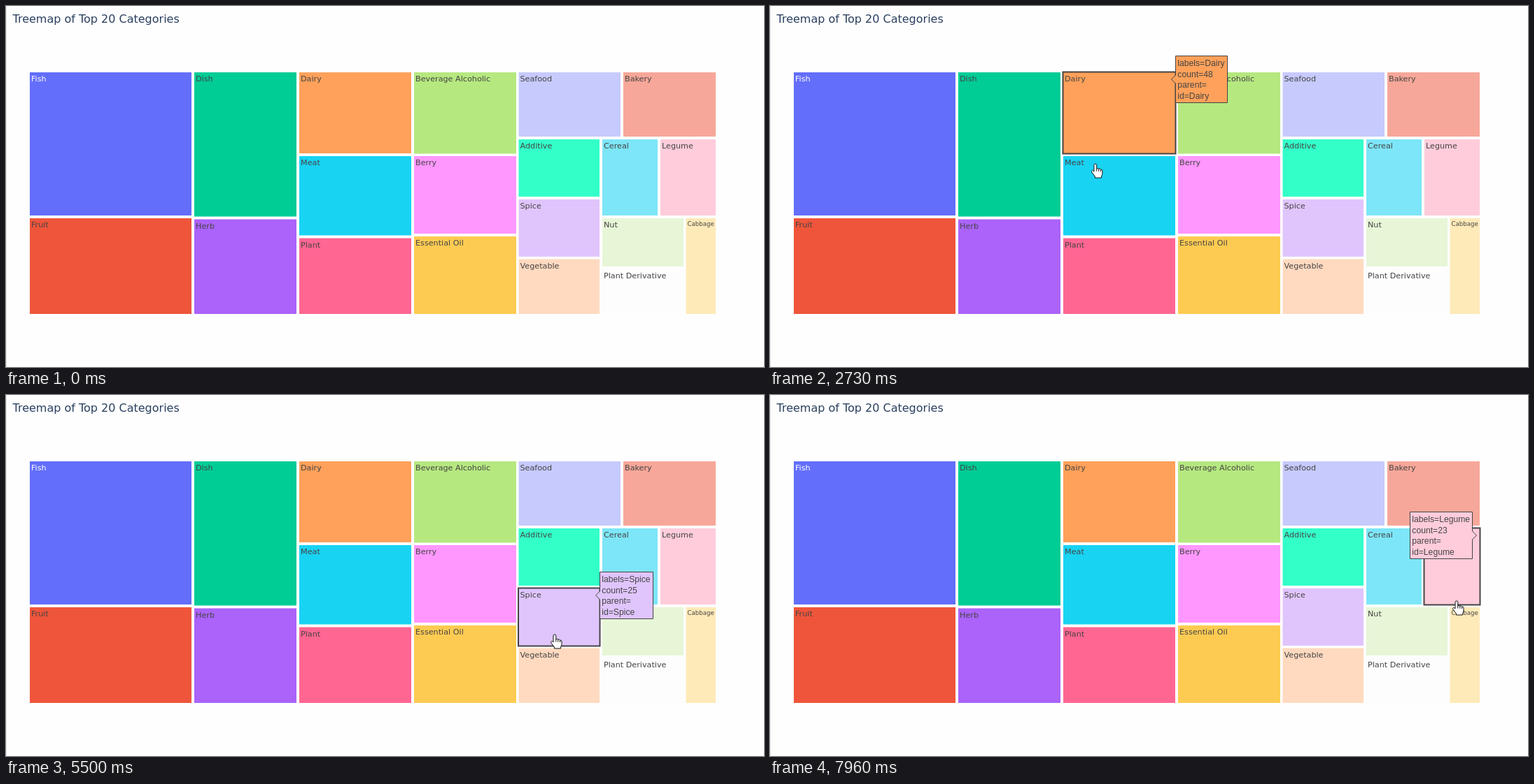
An HTML page with a canvas that plays this animation: 1083 px wide and 517 px high, repeating every 7.99 s.

```html
<!DOCTYPE html>
<html lang="en">
<head>
<meta charset="utf-8">
<title>Treemap of Top 20 Categories</title>
<style>
  html, body { margin: 0; width: 100%; height: 100%; overflow: hidden; background: #fefefe; }
  canvas { display: block; width: 1083px; height: 517px; }
</style>
</head>
<body>
<canvas id="stage"></canvas>
<script>
const W = 1083, H = 517, LOOP = 7990, HOVER_LAG = 40;
const INK = '#444';
const LABEL_FONT = '"DejaVu Sans", sans-serif';
const TIP_FONT = '12.17px "Liberation Sans", Arial, sans-serif';

// label, count, left, top, right, bottom, colour
const cells = [
  ['Fish', 121, 34, 95, 265, 300, '#636efa'],
  ['Fruit', 81, 34, 304, 265, 441, '#ef553b'],
  ['Dish', 77, 269, 95, 415, 301.5, '#00cc96'],
  ['Herb', 51, 269, 305.5, 415, 441, '#ab63fa'],
  ['Dairy', 48, 419, 95, 579, 211, '#ffa15a'],
  ['Meat', 47, 419, 215, 579, 328.5, '#19d3f3'],
  ['Plant', 45, 419, 332.5, 579, 441, '#ff6692'],
  ['Beverage Alcoholic', 44, 583, 95, 729, 211.5, '#b6e880'],
  ['Berry', 42, 583, 215, 729, 326, '#ff97ff'],
  ['Essential Oil', 42, 583, 330, 729, 441, '#fecb52'],
  ['Seafood', 35, 732.5, 95, 878, 187, '#c6cafd'],
  ['Bakery', 32, 882, 95, 1014, 187, '#f7a799'],
  ['Additive', 25, 732.5, 191, 848, 273, '#33ffc9'],
  ['Spice', 25, 732.5, 277, 848, 359, '#e0c5fd'],
  ['Vegetable', 24, 732.5, 362.5, 848, 441, '#ffdac0'],
  ['Cereal', 23, 852, 191, 931, 300, '#7de6f8'],
  ['Legume', 23, 935, 191, 1014, 300, '#ffccdb'],
  ['Nut', 22, 852, 304, 968, 373, '#e7f6d7'],
  ['Plant Derivative', 20, 852, 376.5, 968, 441, '#fdfdfd'],
  ['Cabbage', 16, 971.5, 304, 1014, 441, '#feeab8']
].map(([label, count, x, y, r, b, color]) => ({ label, count, x, y, r, b, color }));

const flipped = new Set(['Legume', 'Plant Derivative', 'Cabbage']);

// Pointer path: time, x, y. A repeated position is a rest.
const path = [
  [340, 515, 492], [430, 333, 476], [680, 333, 476],
  [1080, 113, 198], [1200, 126, 262], [1330, 210, 385], [1450, 273, 436], [1510, 273, 436],
  [1900, 337, 262], [2080, 351, 224], [2290, 410, 187], [2320, 410, 187],
  [2600, 458, 183], [3060, 467, 334], [3330, 467, 334],
  [3560, 585, 361], [4110, 637, 371], [4150, 637, 371],
  [4400, 632, 180], [4900, 755, 160], [4960, 755, 160],
  [5200, 778, 220], [5490, 784, 343], [5890, 784, 343],
  [6100, 803, 385], [6460, 910, 405], [6680, 910, 405],
  [6850, 905, 350], [7030, 893, 285], [7450, 901, 172], [7490, 901, 172],
  [7955, 981, 295], [8000, 981, 295]
];

const same = (p, q) => p[1] === q[1] && p[2] === q[2];

function slope(i, axis) {
  const a = path[i - 1], p = path[i], b = path[i + 1];
  if (!a || !b || same(a, p) || same(p, b)) return 0;
  return (b[axis] - a[axis]) / (b[0] - a[0]);
}

function pointerAt(t) {
  if (t < path[0][0]) return null;
  const i = path.findIndex(p => p[0] > t) - 1;
  const a = path[i], b = path[i + 1], span = b[0] - a[0], u = (t - a[0]) / span;
  const mix = axis => {
    const u2 = u * u, u3 = u2 * u;
    return (2 * u3 - 3 * u2 + 1) * a[axis] + (3 * u2 - 2 * u3) * b[axis] +
      span * ((u3 - 2 * u2 + u) * slope(i, axis) + (u3 - u2) * slope(i + 1, axis));
  };
  return { x: mix(1), y: mix(2) };
}

function cellAt(p) {
  return p && cells.find(c => p.x >= c.x - 2 && p.x < c.r + 2 && p.y >= c.y - 2 && p.y < c.b + 2);
}

const canvas = document.getElementById('stage');
const ctx = canvas.getContext('2d');
const ratio = window.devicePixelRatio || 1;
canvas.width = Math.round(W * ratio);
canvas.height = Math.round(H * ratio);
ctx.scale(ratio, ratio);

function text(str, x, y, font, color) {
  ctx.font = font;
  ctx.fillStyle = color;
  ctx.fillText(str, x, y);
}

function drawCell(c) {
  ctx.fillStyle = c.color;
  ctx.fillRect(c.x, c.y, c.r - c.x, c.b - c.y);
}

function drawLabel(c) {
  const small = c.label === 'Cabbage';
  text(c.label, c.x + 2, c.y + (small ? 11.2 : 13.4),
    `${small ? 8.6 : 11.2}px ${LABEL_FONT}`, c.label === 'Fish' ? '#fff' : INK);
}

function drawOutline(c) {
  ctx.strokeStyle = INK;
  ctx.lineWidth = 2;
  ctx.strokeRect(c.x - 0.5, c.y - 0.5, c.r - c.x + 1, c.b - c.y + 1);
}

function drawTooltip(c) {
  const lines = ['labels=' + c.label, 'count=' + c.count, 'parent=', 'id=' + c.label];
  ctx.font = TIP_FONT;
  const w = Math.round(ctx.measureText(lines[0]).width + 6.5);
  const h = 67, top = Math.round(c.y) - 23.5, mid = top + h / 2;
  const dir = flipped.has(c.label) ? -1 : 1;
  const near = dir > 0 ? c.r + 0.5 : c.r - 10.5;
  const far = near + dir * w;
  ctx.beginPath();
  ctx.moveTo(near - dir * 6, mid);
  ctx.lineTo(near, mid - 6);
  ctx.lineTo(near, top);
  ctx.lineTo(far, top);
  ctx.lineTo(far, top + h);
  ctx.lineTo(near, top + h);
  ctx.lineTo(near, mid + 6);
  ctx.closePath();
  ctx.fillStyle = c.color;
  ctx.fill();
  ctx.strokeStyle = INK;
  ctx.lineWidth = 1;
  ctx.stroke();
  const left = Math.min(near, far) + 2.8;
  lines.forEach((line, i) => text(line, left, top + 14.4 + i * 15.75, TIP_FONT, INK));
}

const hand = new Path2D('M-2 1.6Q-2 0-.1 0Q1.8 0 1.8 1.6V7Q3.2 5.8 5 7.2Q6.6 6.4 7.6 8.2' +
  'Q9.8 7.6 10 9.8V13.6Q10 15.6 8.6 17.4V20H-.6V18L-5 12.2Q-6 10-4.5 9.5Q-3.4 9.4-2 11Z');
const knuckles = new Path2D('M1.8 7V10.5M4.8 7.2V10.8M7.6 8.2V11.2');
const arrow = new Path2D('M0 0V16L3.7 12.6L6.2 18.3L8.6 17.2L6.1 11.7H11.2Z');

function drawPointer(p) {
  const onChart = p.x > 33 && p.x < 1015 && p.y > 94 && p.y < 442;
  ctx.save();
  ctx.translate(p.x, p.y);
  ctx.lineWidth = 1;
  ctx.lineJoin = 'round';
  ctx.fillStyle = '#fff';
  ctx.strokeStyle = '#111';
  const shape = onChart ? hand : arrow;
  ctx.fill(shape);
  ctx.stroke(shape);
  if (onChart) ctx.stroke(knuckles);
  ctx.restore();
}

function draw(t) {
  ctx.fillStyle = '#fefefe';
  ctx.fillRect(0, 0, W, H);
  ctx.fillStyle = '#e4e6e9';
  ctx.fillRect(0, 0, 1, H);
  text('Treemap of Top 20 Categories', 9.5, 24, `16px ${LABEL_FONT}`, '#2a3f5f');
  cells.forEach(drawCell);
  const hovered = cellAt(pointerAt(t - HOVER_LAG));
  if (hovered) drawOutline(hovered);
  cells.forEach(drawLabel);
  if (hovered) drawTooltip(hovered);
  const p = pointerAt(t);
  if (p) drawPointer(p);
}

const start = performance.now();
function tick() {
  draw((performance.now() - start) % LOOP);
  requestAnimationFrame(tick);
}
tick();
</script>
</body>
</html>
```
